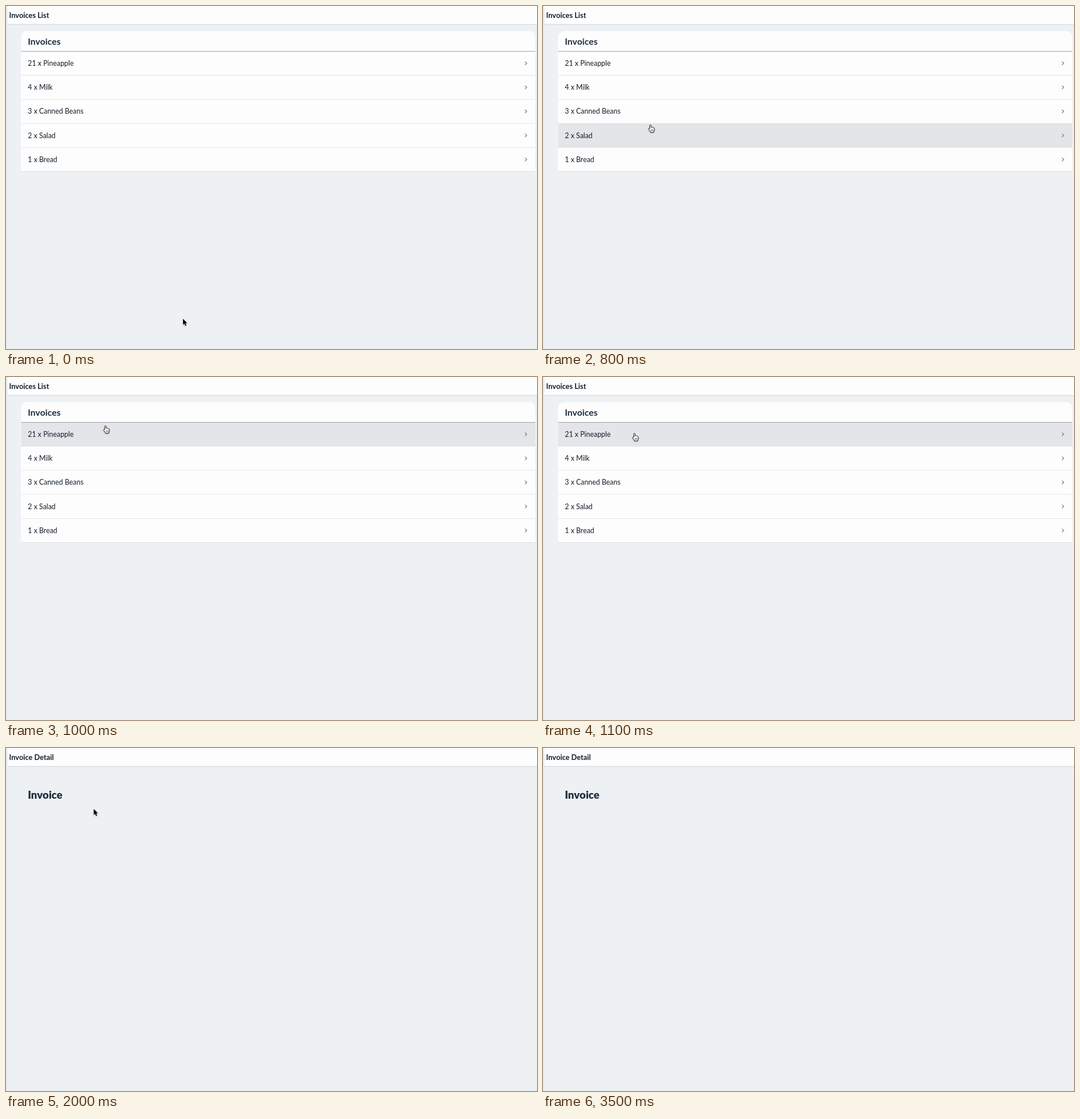
Write an HTML page that moves like this. It is 930x602 px and loops after 4.7 s.

```html
<!DOCTYPE html>
<html lang="en">
<head>
<meta charset="utf-8">
<title>Invoices</title>
<style>
  html, body { margin: 0; width: 100%; height: 100%; overflow: hidden; background: #eef1f4; }
  svg { display: block; }
  text { font-family: Lato, "Open Sans", sans-serif; fill: #1d2d3e; }
  .bar { font-size: 12.8px; font-weight: 700; fill: #131e29; }
  .head { font-size: 15.8px; font-weight: 700; }
  .item { font-size: 12.4px; fill: #131e29; }
  .big { font-size: 18.7px; font-weight: 900; }
  .chevron { fill: none; stroke: #6f7780; stroke-width: 1.2; }
  .focus { fill: none; stroke: #0032a5; stroke-width: 1.6; }
</style>
</head>
<body>
<svg width="930" height="602" viewBox="0 0 930 602">
  <defs>
    <linearGradient id="edge"><stop stop-color="#e6eaed"/><stop offset="1" stop-color="#ebeff2"/></linearGradient>
    <clipPath id="view"><rect x="2.5" width="927.5" height="602"/></clipPath>
    <filter id="shade" x="-50%" y="-50%" width="200%" height="200%">
      <feDropShadow dx="0" dy="1" stdDeviation="0.8" flood-opacity="0.3"/>
    </filter>
    <g id="bar">
      <rect x="2.5" width="950" height="32" fill="#fdfdfd"/>
      <rect x="2.5" y="31.7" width="950" height="1.2" fill="#d7dbde"/>
      <rect x="2.5" y="32.9" width="950" height="1" fill="#e8ebee"/>
    </g>
  </defs>
  <rect width="930" height="602" fill="#eef1f4"/>
  <rect width="2.5" height="602" fill="url(#edge)"/>
  <g clip-path="url(#view)">
    <g id="list">
      <use href="#bar"/>
      <text class="bar" x="5.6" y="20.6">Invoices List</text>
      <path d="M26.5 290V56q0-12 12-12H915q12 0 12 12V290z" fill="#fdfdfd"/>
      <text class="head" x="38.3" y="67.6">Invoices</text>
      <g id="rows"></g>
      <rect x="26.5" y="79" width="900.5" height="1.2" fill="#a9adb1"/>
      <rect id="focus" class="focus" x="27.8" y="81.3" width="897.8" height="39.6"/>
    </g>
    <g id="detail">
      <use href="#bar"/>
      <text class="bar" x="5.6" y="20.6">Invoice Detail</text>
      <text class="big" x="38.2" y="89">Invoice</text>
    </g>
  </g>
  <g id="arrow" filter="url(#shade)">
    <path d="M0 0V10.4L2.3 8.3L4 12.2L5.9 11.4L4.2 7.6H7.4z" fill="#000" stroke="#fff" stroke-width="0.8" paint-order="stroke"/>
  </g>
  <g id="hand" filter="url(#shade)">
    <path d="M-.9 6.6V.6Q-.8-.5.2-.5T1.3.6V4Q2.6 3.2 3.3 4.2Q4.6 3.5 5.3 4.7Q7 4.3 7 6.2V8.6Q6.8 10 6 11V12.6H.1V11.4L-3 7.7Q-3.6 6.4-2.5 5.9Q-1.7 5.7-.9 6.6z"
      fill="#fff" stroke="#111" stroke-width="0.9" stroke-linejoin="round"/>
    <path d="M1.4 7.5V10.3M3.1 7.5V10.3M4.8 7.5V10.3" stroke="#222" stroke-width="0.7"/>
  </g>
</svg>
<script>
const LOOP = 4700, STEP = 100, PITCH = 42.2;
const $ = id => document.getElementById(id);

const items = ["21 x Pineapple", "4 x Milk", "3 x Canned Beans", "2 x Salad", "1 x Bread"];
$("rows").innerHTML = items.map((label, i) => `
  <g transform="translate(0 ${(i * PITCH).toFixed(1)})">
    <rect class="fill" x="26.5" y="80" width="900.5" height="41.6"/>
    <rect x="26.5" y="121.3" width="900.5" height="1" fill="#dcdfe2"/>
    <text class="item" x="38.3" y="105">${label}</text>
    <path class="chevron" d="M909 97.6L912 100.6L909 103.6"/>
  </g>`).join("");
const fills = document.querySelectorAll(".fill");

// time, shape, x, y of the pointer's tip
const pointer = [
  [0, "arrow", 310, 549], [300, "arrow", 292, 488], [400, "arrow", 250, 372],
  [500, "hand", 210, 262], [600, "hand", 193, 226], [800, "hand", 188, 209],
  [900, "arrow", 196.5, 70], [1000, "hand", 174, 86], [1100, "hand", 160, 99.5],
  [1200, "hand", 155.5, 104.5], [1300, "hand", 153.7, 107], [1600, "arrow", 153.7, 107],
  [2500, "arrow", 149, 103], [2600, "arrow", 130, 87], [2700, "arrow", 113, 72],
  [2800, "arrow", 106.8, 66.5], [3500, "none", 0, 0]
];
// time, hovered row
const hover = [[0, -1], [500, 4], [600, 3], [900, 0]];
// time, list shift and opacity, detail shift and opacity
const pages = [
  [0, 0, 1, 0, 0], [1600, -2, 0.86, 0, 0], [1700, -6.8, 0.5, 0, 0],
  [1800, -10, 0.12, 6, 0.1], [1900, 0, 0, 2, 0.7], [2000, 0, 0, 0, 1]
];
const at = (table, t) => table.findLast(row => row[0] <= t);

function place(el, x, y, opacity) {
  el.setAttribute("transform", `translate(${x} ${y})`);
  el.setAttribute("opacity", opacity);
}

function draw(t) {
  const [, shape, x, y] = at(pointer, t);
  for (const id of ["arrow", "hand"]) place($(id), x, y, +(id === shape));

  const row = at(hover, t)[1], pressed = t >= 1500;
  fills.forEach((el, i) =>
    el.setAttribute("fill", i !== row ? "#fdfdfd" : pressed ? "#dadade" : "#e4e5e9"));
  $("focus").setAttribute("opacity", +pressed);

  const [, listX, listAlpha, detailX, detailAlpha] = at(pages, t);
  place($("list"), listX, 0, listAlpha);
  place($("detail"), detailX, 0, detailAlpha);
}

const start = performance.now();
function tick() {
  const t = (performance.now() - start) % LOOP;
  draw(Math.floor(t / STEP) * STEP);
  requestAnimationFrame(tick);
}
tick();
</script>
</body>
</html>
```
